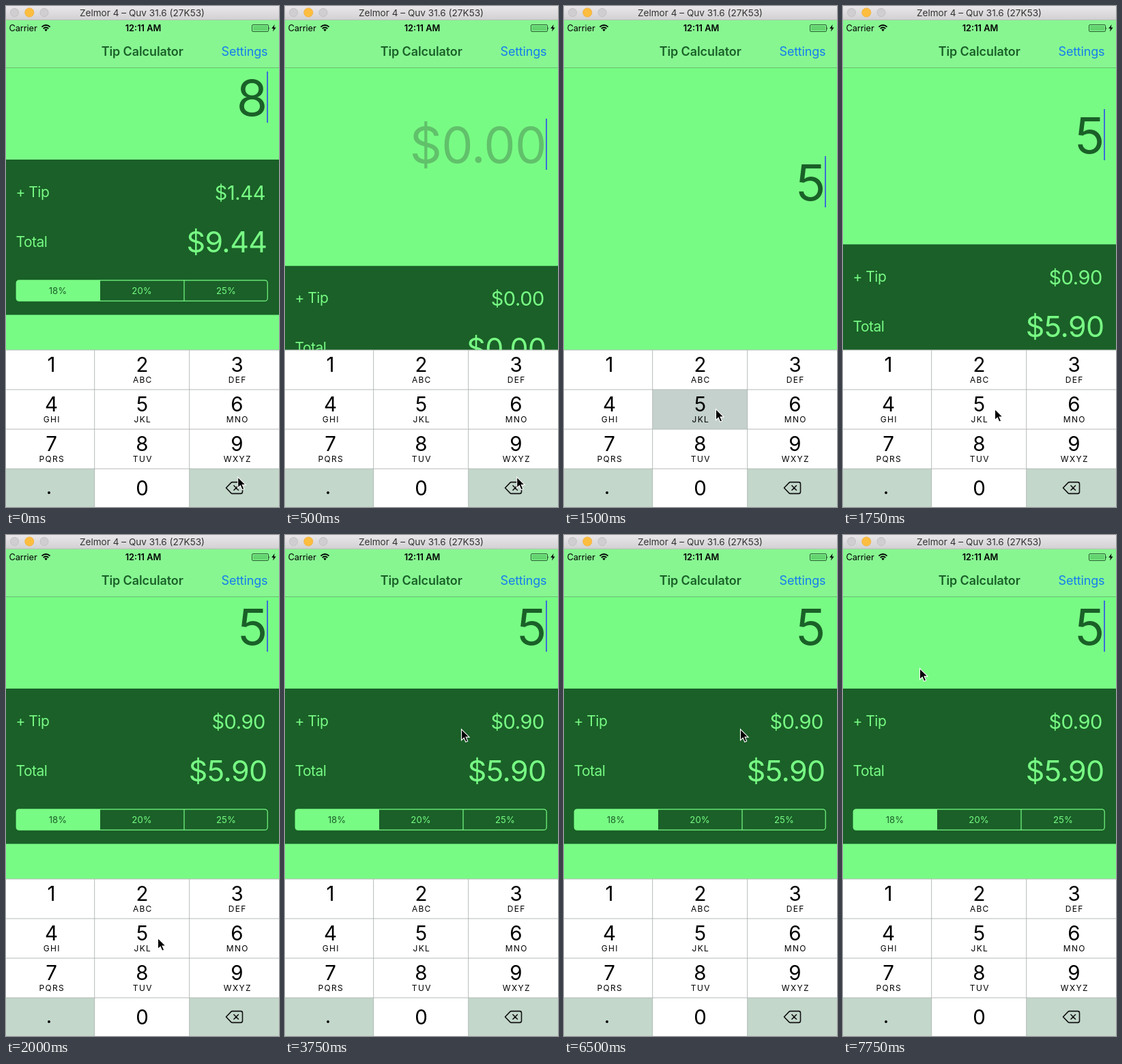
These frames come from a looping animation (400x734 px, 8000 ms). An HTML page:

```html
<!DOCTYPE html>
<html lang="en">
<head>
<meta charset="utf-8">
<title>Tip Calculator</title>
<style>
html, body { margin: 0; width: 100%; height: 100%; overflow: hidden; background: #78fb84; }
svg { display: block; width: 400px; height: 734px; font-family: Inter, Roboto, sans-serif; }
.mid { text-anchor: middle; }
.end { text-anchor: end; }
.big { font-size: 73.5px; letter-spacing: -.8px; }
</style>
</head>
<body>
<svg id="stage" viewBox="0 0 400 734">
  <defs>
    <linearGradient id="bar" x2="0" y2="1">
      <stop stop-color="#e9e7e9"/><stop offset="1" stop-color="#d2d0d2"/>
    </linearGradient>
  </defs>
  <rect width="400" height="734" fill="#78fb84"/>

  <g id="field">
    <text id="amount" class="end big" x="382.5" y="160.6"></text>
    <rect id="caret" x="382" y="96" width="2" height="75" fill="#3b6ed8"/>
  </g>

  <g id="panel" fill="#78fb84">
    <rect y="225" width="400" height="227.5" fill="#1a6028"/>
    <g font-size="21" letter-spacing="-.5">
      <text x="14.5" y="279.6">+ Tip</text>
      <text x="14.5" y="352.6">Total</text>
    </g>
    <text id="tip" class="end" x="380" y="283.5" font-size="29" letter-spacing="-.4"></text>
    <text id="total" class="end" x="382.5" y="361" font-size="43" letter-spacing="-.6"></text>
    <path d="M138 402H19a4 4 0 0 0-4 4v22a4 4 0 0 0 4 4h119z"/>
    <rect x="15.2" y="401.8" width="368" height="30.4" rx="4" fill="none" stroke="#78fb84" stroke-width="1.2"/>
    <path d="M261 402v30" stroke="#78fb84" stroke-width="1.2"/>
    <g class="mid" font-size="13.2">
      <text x="76" y="421.7" fill="#1a6028">18%</text>
      <text x="199" y="421.7">20%</text>
      <text x="322.5" y="421.7">25%</text>
    </g>
  </g>

  <rect y="20" width="400" height="70" fill="#87f691"/>
  <path d="M0 90.5H400" stroke="#66bf70"/>
  <text class="mid" x="199.7" y="73" font-size="18" font-weight="600" letter-spacing="-.1" fill="#1a6028">Tip Calculator</text>
  <text class="end" x="383.3" y="73" font-size="18" letter-spacing="-.2" fill="#147ded">Settings</text>
  <text x="4.5" y="37" font-size="12.8" letter-spacing="-.1">Carrier</text>
  <text class="mid" x="201" y="37" font-size="12.8" font-weight="600">12:11 AM</text>
  <g fill="none" stroke="#000" stroke-width="1.9">
    <path d="M52.4 30.6Q58.5 25.4 64.6 30.6M54.7 33.1Q58.5 29.8 62.3 33.1"/>
    <path d="M56.3 34.6Q58.5 32.9 60.7 34.6L58.5 37.2z" fill="#000" stroke="none"/>
  </g>
  <rect x="360.5" y="27.5" width="24" height="10" rx="1.5" fill="none" stroke="#245c2d"/>
  <rect x="362" y="29" width="21" height="7" fill="#63d46f"/>
  <path d="M385.2 30.5q1.6 2 0 4z" fill="#245c2d"/>
  <path d="M393.6 27l-4.4 6h2.8l-1 4.6 4.6-6.2h-2.9z"/>

  <rect width="400" height="20.5" fill="url(#bar)"/>
  <path d="M0 20.3H400" stroke="#aeb8ae" stroke-width=".8"/>
  <g fill="#d0ced0" stroke="#bcbabc" stroke-width=".8">
    <circle cx="12.5" cy="9.5" r="6"/>
    <circle cx="34.3" cy="9.5" r="6.6" fill="#fdbd3e" stroke="#f0b040"/>
    <circle cx="56" cy="9.5" r="6"/>
  </g>
  <text class="mid" x="199.5" y="14.8" font-size="13.6" fill="#333">Zelmor 4 – Quv 31.6 (27K53)</text>

  <g id="keys"></g>
  <path d="M322.5 706l7.3-7.6q.8-.8 1.9-.8h12.2q2.6 0 2.6 2.6v11.6q0 2.6-2.6 2.6h-12.2q-1.1 0-1.9-.8zM333.5 702.3l7.4 7.4m0-7.4l-7.4 7.4" fill="none" stroke="#111" stroke-width="1.6" stroke-linejoin="round"/>

  <path id="mouse" d="M0 0V16.2L3.7 12.8 6.3 18.8 9.2 17.5 6.6 11.6H11.6Z" fill="#000" stroke="#fff" stroke-width="1.1"/>
</svg>
<script>
const $ = id => document.getElementById(id);
const LOOP = 8000, STEP = 250, DELETE = 250, TYPE = 1500, SLIDE = 465;
const cols = [0, 130, 269, 400], rows = [504, 562, 620, 678, 734];
const mid = [66.5, 199.5, 338.5];
const letters = ['', 'ABC', 'DEF', 'GHI', 'JKL', 'MNO', 'PQRS', 'TUV', 'WXYZ'];
const GREY = '#c3d7cb', DOWN = '#c4d1cd';

function add(tag, attrs, text = '') {
  const el = document.createElementNS('http://www.w3.org/2000/svg', tag);
  for (const k in attrs) el.setAttribute(k, attrs[k]);
  el.textContent = text;
  $('keys').append(el);
  return el;
}

const keys = ['1', '2', '3', '4', '5', '6', '7', '8', '9', '.', '0', ''].map((label, i) => {
  const c = i % 3, r = Math.floor(i / 3), y = rows[r];
  const box = add('rect', {
    x: cols[c], y, width: cols[c + 1] - cols[c], height: rows[r + 1] - y,
    fill: i === 9 || i === 11 ? GREY : '#fff'
  });
  add('text', {
    class: 'mid', x: i === 9 ? 63 : mid[c], y: i === 9 ? 715 : r === 3 ? 717 : y + 32, 'font-size': 29.5
  }, label);
  if (letters[i]) add('text', {
    class: 'mid', x: mid[c] + .8, y: y + 48, 'font-size': 12, 'letter-spacing': 1.3
  }, letters[i]);
  return box;
});
add('path', {
  d: 'M0 504H400M0 562H400M0 620H400M0 678H400M129.7 504V734M268.7 504V734',
  stroke: '#b3bab7', 'stroke-width': 1
});

const clamp = v => Math.min(1, Math.max(0, v));
const ease = v => v * v * (3 - 2 * v);
const ramp = (t, from, to) => ease(clamp((t - from) / (to - from)));

// Mouse rests at each point between its moves: start, end, x, y
const moves = [[500, 1400, 222.5, 590.5], [2000, 3000, 258.5, 284.5], [7000, 7750, 112.5, 195.5]];

function mouseAt(t) {
  let x = 339.7, y = 690;
  for (const [from, to, mx, my] of moves) {
    const p = ramp(t, from, to);
    x += (mx - x) * p;
    y += (my - y) * p;
  }
  return `translate(${x} ${y})`;
}

function caretOn(t) {
  const idle = t - (t >= TYPE ? TYPE : DELETE) - 750;
  return idle < 0 || idle % 1000 >= 500;
}

function draw(t) {
  const empty = t >= DELETE && t < TYPE;
  const bill = t < DELETE ? 8 : empty ? 0 : 5;
  const money = v => '$' + v.toFixed(2);
  const drop = t < TYPE ? ramp(t, DELETE, DELETE + SLIDE) : 1 - ramp(t, TYPE, TYPE + SLIDE);

  $('amount').textContent = empty ? '$0.00' : bill;
  $('amount').setAttribute('fill', empty ? '#61c16b' : '#1a6028');
  $('tip').textContent = money(bill * .18);
  $('total').textContent = money(bill * 1.18);
  $('field').setAttribute('transform', `translate(0 ${124 * drop})`);
  $('panel').setAttribute('transform', `translate(0 ${280 * drop})`);
  $('caret').setAttribute('opacity', caretOn(t) ? 1 : 0);
  keys[4].setAttribute('fill', t >= TYPE && t < TYPE + STEP ? DOWN : '#fff');
  keys[11].setAttribute('fill', t >= DELETE && t < DELETE + STEP ? '#fff' : GREY);
  $('mouse').setAttribute('transform', mouseAt(t));
}

const start = performance.now();
function tick() {
  const t = (performance.now() - start) % LOOP;
  draw(Math.floor(t / STEP) * STEP);
  requestAnimationFrame(tick);
}
tick();
</script>
</body>
</html>
```
